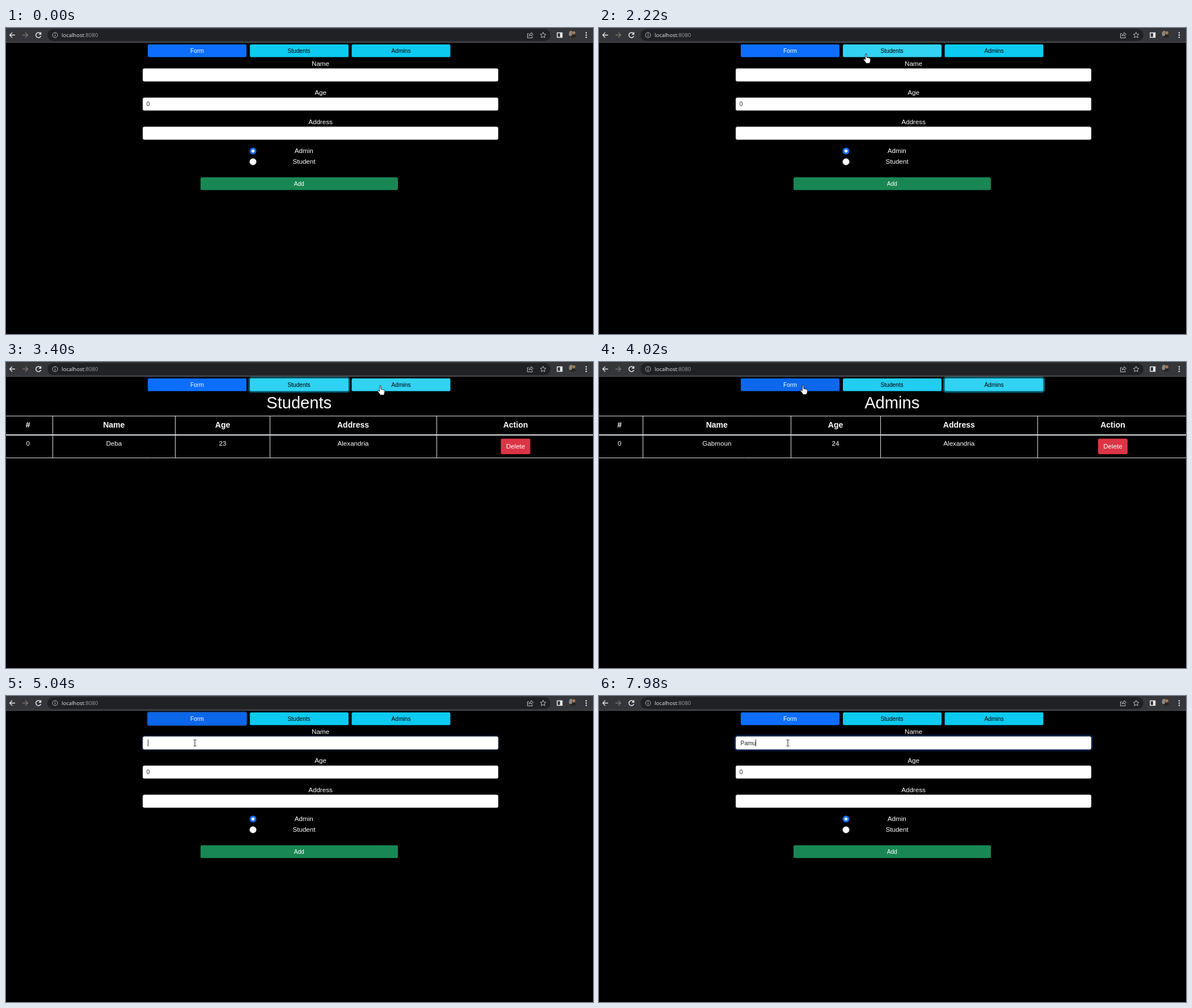
Animation of 1035x541 px, one loop 8000 ms. Source, as an HTML page:

```html
<!DOCTYPE html>
<html lang="en">
<head>
<meta charset="utf-8">
<title>Form demo</title>
<style>
html, body { margin: 0; height: 100%; overflow: hidden; background: #000; }
svg { display: block; width: 100vw; height: 100vh; }
text { font: 11.65px "Liberation Sans", Arial, sans-serif; fill: #fff; text-anchor: middle; white-space: pre; }
.small { font-size: 10.2px; }
.title { font-size: 29.1px; }
.head { font-size: 14px; font-weight: bold; }
.dark { fill: #000; }
.value { font-size: 10.2px; fill: #212529; text-anchor: start; }
.url { font: 9.5px "Open Sans", "Noto Sans", sans-serif; fill: #e8eaed; text-anchor: start; }
.icon { fill: none; stroke: #e8eaed; stroke-width: 1.3; }
.input { fill: #fff; stroke: #ced4da; stroke-width: .7; }
.rules { fill: none; stroke: #dee2e6; stroke-width: 1; }

.tab, #name { paint-order: stroke; stroke-width: 0; }
#tabForm { fill: #0d6efd; stroke: #18427e; }
.info { fill: #0dcaf0; stroke: #065666; }
.ring { fill: none; stroke: #031b3f; stroke-width: 5.8; }

.tab, .view, .ring, #cursor, #cursor > *, .typed, #caret {
  animation: 8s linear infinite;
}
.view, .typed, #caret, #cursor > * { animation-timing-function: step-end; }

#form { animation-name: form; }
#students { animation-name: students; }
#admins { animation-name: admins; }
@keyframes form { 0%, 54.36% { visibility: visible } 32.11% { visibility: hidden } 100% { visibility: visible } }
@keyframes students { 0%, 43.36%, 100% { visibility: hidden } 32.11% { visibility: visible } }
@keyframes admins { 0%, 54.36%, 100% { visibility: hidden } 43.36% { visibility: visible } }

#tabForm { animation-name: tabForm; }
#tabStudents { animation-name: tabStudents; }
#tabAdmins { animation-name: tabAdmins; }
@keyframes tabForm {
  0%, 49.4% { fill: #0d6efd }
  51.3% { fill: #0b5ed7 }
  53.7% { fill: #0b5ed7; stroke-width: 0 }
  55.6%, 62.1% { fill: #0b5ed7; stroke-width: 5.8 }
  63.9%, 100% { fill: #0d6efd; stroke-width: 0 }
}
@keyframes tabStudents {
  0%, 25.7% { fill: #0dcaf0 }
  27.6% { fill: #31d2f2 }
  31.2% { stroke-width: 0 }
  33.1%, 42.4% { fill: #31d2f2; stroke-width: 5.8 }
  44.3%, 45.7% { fill: #0dcaf0; stroke-width: 0 }
  47.5%, 49.4% { fill: #31d2f2 }
  51.3%, 100% { fill: #0dcaf0; stroke-width: 0 }
}
@keyframes tabAdmins {
  0%, 36.6% { fill: #0dcaf0 }
  38.5%, 53.4% { fill: #31d2f2 }
  42.4% { stroke-width: 0 }
  44.3%, 53% { stroke-width: 5.8 }
  54.3% { stroke-width: 0 }
  55.3%, 100% { fill: #0dcaf0; stroke-width: 0 }
}

.ring { animation-name: ring; }
@keyframes ring { 0%, 62.1% { opacity: 0 } 63.9%, 99.99% { opacity: 1 } 100% { opacity: 0 } }

#cursor { animation-name: move; }
@keyframes move {
  0%, 5.87% { transform: translate(883px, 449px); animation-timing-function: ease-in-out }
  15.25%, 20.9% { transform: translate(334px, 87px); animation-timing-function: ease-in-out }
  27.75%, 33% { transform: translate(471px, 45px) }
  37.5% { transform: translate(636px, 39.5px); animation-timing-function: ease-out }
  40.75%, 44.5% { transform: translate(660px, 41px) }
  50.25% { transform: translate(360px, 40px); animation-timing-function: ease-out }
  51.2%, 57% { transform: translate(347px, 40px); animation-timing-function: ease-in-out }
  59.6%, 100% { transform: translate(333px, 83px) }
}
#arrow { animation-name: arrow; }
#hand { animation-name: hand; }
#beam { animation-name: beam; }
@keyframes arrow {
  0%, 14%, 25.7%, 59.4%, 100% { visibility: hidden }
  5.87%, 23.8%, 58.2% { visibility: visible }
}
@keyframes hand { 0%, 58.2%, 100% { visibility: hidden } 25.7% { visibility: visible } }
@keyframes beam {
  0%, 23.8% { visibility: hidden }
  14%, 59.4% { visibility: visible }
  100% { visibility: hidden }
}

.k1 { animation-name: key1; }
.k2 { animation-name: key2; }
.k3 { animation-name: key3; }
.k4 { animation-name: key4; }
@keyframes key1 { 0%, 100% { visibility: hidden } 80.74% { visibility: visible } }
@keyframes key2 { 0%, 100% { visibility: hidden } 84.99% { visibility: visible } }
@keyframes key3 { 0%, 100% { visibility: hidden } 89.11% { visibility: visible } }
@keyframes key4 { 0%, 100% { visibility: hidden } 99.74% { visibility: visible } }
#caret { animation-name: caret; }
@keyframes caret {
  0% { opacity: 0; transform: none }
  62.12% { opacity: 1; transform: none }
  68.99% { opacity: 0; transform: none }
  75.86% { opacity: 1; transform: none }
  80.74% { opacity: 1; transform: translateX(6px) }
  84.99% { opacity: 1; transform: translateX(12px) }
  89.11% { opacity: 1; transform: translateX(20px) }
  95.61% { opacity: 0; transform: translateX(20px) }
  99.74% { opacity: 1; transform: translateX(26px) }
  100% { opacity: 0; transform: none }
}
</style>
</head>
<body>
<svg viewBox="0 0 1035 541">
  <!-- browser bar -->
  <rect width="1035" height="25" fill="#35363a"/>
  <rect y="25" width="1035" height="1" fill="#55565a"/>
  <rect x="73" y="2" width="887" height="21" rx="10.5" fill="#202124"/>
  <g class="icon">
    <path d="M16 12.5H7M11 8l-4.500 4.500 4.500 4.500"/>
    <path d="M29 12.500h9M34 8l4.500 4.500-4.500 4.500" stroke="#80746c" style="stroke:#80746c"/>
    <path d="M61 10a4.500 4.500 0 1 0 .5 4M61.500 7.500v3.500h-3.500" stroke-width="1.5"/>
    <g style="stroke:#bdc1c6;stroke-width:1">
      <circle cx="86.500" cy="12.500" r="4.500"/>
      <path d="M86.500 11.800v3.200M86.500 9.500v1.200"/>
      <path d="M922 10h-2.500v7.500h8.500v-2.500M922 14.500q.5-4.500 4-4.500v-2l3.500 3.200-3.500 3.200v-2q-2.500 0-4 2.100z"/>
      <path d="M947 7.500l1.500 3.300 3.500.4-2.600 2.400.7 3.500-3.100-1.800-3.100 1.800.7-3.500-2.600-2.400 3.500-.4z"/>
    </g>
    <rect x="972" y="8.500" width="8.500" height="8" stroke-width="1.5"/>
  </g>
  <rect x="977" y="8" width="4" height="9" fill="#e8eaed"/>
  <g fill="#e8eaed"><circle cx="1023" cy="8.500" r="1.200"/><circle cx="1023" cy="12.500" r="1.200"/><circle cx="1023" cy="16.500" r="1.200"/></g>
  <clipPath id="round"><circle cx="999.500" cy="10.500" r="7"/></clipPath>
  <g clip-path="url(#round)">
    <rect x="992" y="3" width="15" height="15" fill="#3b3632"/>
    <rect x="992" y="5" width="6" height="9" fill="#85898a"/>
    <circle cx="1001" cy="8.500" r="2.800" fill="#a9794f"/>
    <path d="M995 18q1-6 6-6t6 6z" fill="#2b2522"/>
  </g>
  <text class="url" x="98" y="16">localhost<tspan fill="#9aa0a6">:8080</tspan></text>

  <!-- tabs -->
  <rect id="tabForm" class="tab" x="250" y="29" width="174" height="22.500" rx="2.500"/>
  <rect id="tabStudents" class="tab info" x="430" y="29" width="174" height="22.500" rx="2.500"/>
  <rect id="tabAdmins" class="tab info" x="609.500" y="29" width="174" height="22.500" rx="2.500"/>
  <text class="small" x="337" y="43.500">Form</text>
  <text class="small dark" x="516.500" y="43.500">Students</text>
  <text class="small dark" x="696.500" y="43.500">Admins</text>

  <g id="form" class="view">
    <text x="554.500" y="66.500">Name</text>
    <text x="554.500" y="118">Age</text>
    <text x="554.500" y="169.500">Address</text>
    <rect class="ring" x="241" y="71.500" width="627" height="23" rx="3"/>
    <rect class="input" x="241.300" y="71.800" width="626.400" height="22.400" rx="2.500"/>
    <rect class="input" x="241.300" y="123.300" width="626.400" height="22.400" rx="2.500"/>
    <rect class="input" x="241.300" y="174.800" width="626.400" height="22.400" rx="2.500"/>
    <text class="value" x="247.800" y="138">0</text>
    <circle cx="435.500" cy="217.500" r="6" fill="#0d6efd"/>
    <circle cx="435.500" cy="217.500" r="2.700" fill="#fff"/>
    <circle cx="435.500" cy="236.500" r="5.800" fill="#fff" stroke="#bfbfbf" stroke-width=".6"/>
    <text x="525.300" y="221">Admin</text>
    <text x="525.500" y="240">Student</text>
    <rect x="343" y="264" width="348" height="22.500" rx="2.500" fill="#198754"/>
    <text class="small" x="516.700" y="278.500">Add</text>
  </g>
  <text class="value" x="249.600" y="86.500"><tspan class="typed k1">P</tspan><tspan class="typed k2">a</tspan><tspan class="typed k3">m</tspan><tspan class="typed k4">u</tspan></text>
  <rect id="caret" x="250" y="77" width="1" height="12" fill="#212529"/>

  <g id="students" class="view"></g>
  <g id="admins" class="view"></g>

  <g id="cursor">
    <path id="arrow" d="M0 0v15l3.500-3.200 2.300 5.200 2.400-1-2.300-5.100h4.800z" fill="#fff" stroke="#000" stroke-width=".8"/>
    <path id="hand" d="M-1 1q1-1.600 2 0v6l5.500 1.400q1.500.5 1.400 2.200l-.8 4.400-1 2.500h-6l-1.500-2.500-3.300-4.200q0-1.600 1.600-1.300l1.600 1.600z" fill="#fff" stroke="#000" stroke-width=".8"/>
    <path id="beam" d="M-2.500-5.500h2l.5.5.5-.5h2M0-5v10M-2.500 5.500h2l.5-.5.5.5h2" fill="none" stroke="#222" stroke-width="1"/>
  </g>
</svg>
<script>
const headings = ["#", "Name", "Age", "Address", "Action"];

function drawTable(id, title, row, rules, centers) {
  const label = (words, x, y, kind = "") => `<text class="${kind}" x="${x}" y="${y}">${words}</text>`;
  const last = centers[4];
  document.getElementById(id).innerHTML =
    label(title, 516.7, 82, "title") +
    `<path class="rules" d="M0 95.5H1035M0 169.5H1035${rules.map(x => `M${x + .5} 95.5V169.5`).join("")}"/>` +
    `<path class="rules" style="stroke-width:2" d="M0 129H1035"/>` +
    headings.map((word, i) => label(word, centers[i], 116, "head")).join("") +
    row.map((word, i) => label(word, centers[i], 148)).join("") +
    `<rect x="${last - 26}" y="135.5" width="52" height="27.5" rx="2.7" fill="#dc3545"/>` +
    label("Delete", last, 153);
}

drawTable("students", "Students", [0, "Deba", 23, "Alexandria"], [82, 298, 465, 759], [38.7, 190.3, 382, 612, 898.5]);
drawTable("admins", "Admins", [0, "Gabmoun", 24, "Alexandria"], [77, 338, 496, 773], [36.2, 207.8, 417, 634.8, 906]);
</script>
</body>
</html>
```
